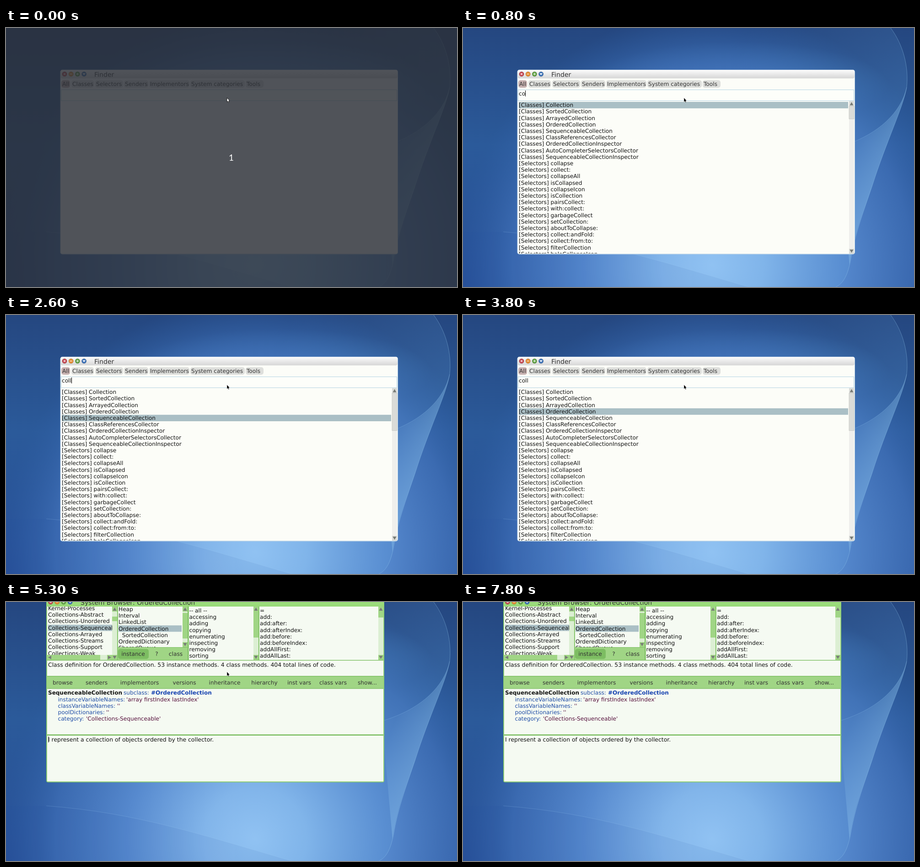
An HTML page for the animation above (8 s loop, 986 by 568 pixels).

```html
<!DOCTYPE html>
<html lang="en">
<head>
<meta charset="utf-8">
<title>Finder to browser</title>
<style>
  html, body { margin: 0; width: 100%; height: 100%; overflow: hidden; background: #26498a; }
  svg { display: block; }
  text { font: 12.15px "DejaVu Sans", sans-serif; fill: #111; white-space: pre; text-rendering: geometricPrecision; }
  .title { font-size: 14.1px; fill: #333; }
  .tab { font-size: 12.2px; fill: #333; }
  .mid { text-anchor: middle; }
  .wide { font-size: 12.4px; }
  .bold { font-weight: bold; font-size: 12px; }
  .key { fill: #1f4ca6; }
  .ref { fill: #1440b0; }
  .str { fill: #56103c; }
  .count { font: 19px Lato, sans-serif; fill: #fff; }
</style>
</head>
<body>
<svg id="stage" width="986" height="568" viewBox="0 0 986 568">
  <defs>
    <linearGradient id="sky" x2="0" y2="1">
      <stop offset="0" stop-color="#254780"/>
      <stop offset=".45" stop-color="#2b5a9a"/>
      <stop offset="1" stop-color="#274f97"/>
    </linearGradient>
    <radialGradient id="glow" gradientUnits="userSpaceOnUse" cx="545" cy="520" r="560">
      <stop offset="0" stop-color="#92c3f3"/>
      <stop offset=".2" stop-color="#82b5ea"/>
      <stop offset=".5" stop-color="#5689ce"/>
      <stop offset=".78" stop-color="#3e6eb5" stop-opacity=".85"/>
      <stop offset="1" stop-color="#2e5ea3" stop-opacity="0"/>
    </radialGradient>
    <radialGradient id="haze">
      <stop offset="0" stop-color="#5a9ad0" stop-opacity=".75"/>
      <stop offset="1" stop-color="#4a86c0" stop-opacity="0"/>
    </radialGradient>
    <linearGradient id="sheet" gradientUnits="userSpaceOnUse" x1="600" y1="60" x2="960" y2="200">
      <stop offset="0" stop-color="#6fb0e8" stop-opacity="0"/>
      <stop offset="1" stop-color="#6fb0e8" stop-opacity=".16"/>
    </linearGradient>
    <linearGradient id="fold" gradientUnits="userSpaceOnUse" x1="835" y1="300" x2="915" y2="330">
      <stop offset="0" stop-color="#8cc0ea" stop-opacity=".06"/>
      <stop offset="1" stop-color="#8cc0ea" stop-opacity=".42"/>
    </linearGradient>
    <linearGradient id="silver" x2="0" y2="1">
      <stop offset="0" stop-color="#fcfcfc"/>
      <stop offset="1" stop-color="#d6d6d6"/>
    </linearGradient>
    <linearGradient id="lime" x2="0" y2="1">
      <stop offset="0" stop-color="#a4e682"/>
      <stop offset="1" stop-color="#97d878"/>
    </linearGradient>
    <clipPath id="hits"><path d="M120 161H844V494.500H120Z"/></clipPath>
    <clipPath id="packages"><path d="M90 10H232V116H90Z"/></clipPath>
    <clipPath id="classes"><path d="M245 10H386V99H245Z"/></clipPath>
    <clipPath id="members"><path d="M400 10H814V126H400Z"/></clipPath>
  </defs>

  <g id="wallpaper" fill="none">
    <rect width="986" height="568" fill="url(#sky)"/>
    <ellipse cx="600" cy="125" rx="330" ry="95" fill="url(#haze)"/>
    <rect width="986" height="568" fill="url(#glow)"/>
    <path d="M935 0C962 36 975 85 970 130C962 175 925 250 895 345C872 412 857 455 849 500C842 542 832 560 815 568H500V0Z" fill="url(#sheet)"/>
    <path d="M970 130C957 190 900 238 822 261L845 520C855 450 873 412 895 345C925 250 962 175 970 130Z" fill="url(#fold)"/>
    <path d="M970 130C957 190 900 238 822 261" stroke="#8fc0ea" stroke-opacity=".3"/>
    <path d="M935 0C962 36 975 85 970 130C962 175 925 250 895 345C872 412 857 455 849 500C842 542 832 560 815 568" stroke="#9accf0" stroke-opacity=".38"/>
    <path d="M88 447C290 462 430 512 625 568H0V447Z" fill="#20509c" fill-opacity=".07"/>
    <path d="M88 447C290 462 430 512 625 568" stroke="#a5d0f5" stroke-opacity=".22"/>
  </g>

  <g id="finder"></g>
  <g id="browser"></g>
  <rect id="caret" width="1" height="13"/>
  <g id="intro">
    <rect width="986" height="568" fill="#2b2f36" fill-opacity=".82"/>
    <text class="count mid" x="492.500" y="290.500">1</text>
  </g>
  <path id="pointer" d="M0 0V9.200L2 7.500L3.500 10.400L5 9.600L3.600 6.900L6 6.500Z" stroke-width=".8"/>
</svg>
<script>
const NS = "http://www.w3.org/2000/svg";
const PITCH = 14.2, LOOP = 8000;
const $ = id => document.getElementById(id);

function add(parent, tag, attrs, content) {
  const el = document.createElementNS(NS, tag);
  for (const key in attrs) el.setAttribute(key, attrs[key]);
  if (content !== undefined) el.textContent = content;
  parent.appendChild(el);
  return el;
}
const box = (g, x, y, right, bottom, fill, rx = 0) =>
  add(g, "rect", { x, y, width: right - x, height: bottom - y, fill, rx });
const label = (g, x, y, content, cls = "") => add(g, "text", { x, y, class: cls }, content);
const rows = (g, x, y, names) => names.forEach((name, i) => label(g, x, y + i * PITCH, name));

function lights(g, x, y) {
  const signs = ["M-2 -2L2 2M2 -2L-2 2", "M-2.500 0H2.500", "M-2.500 0H2.500M0 -2.500V2.500", "M-2 -1H2L0 1.500Z"];
  ["#c5444e", "#e58f37", "#62a346", "#3f74b9"].forEach((fill, i) => {
    const button = add(g, "g", { transform: `translate(${x + i * 14.2} ${y})` });
    add(button, "circle", { r: 5.2, fill, stroke: "#000", "stroke-opacity": .25, "stroke-width": .8 });
    add(button, "path", { d: signs[i], fill: "#fff", stroke: "#fff", "stroke-width": 1.3, "stroke-opacity": .85 });
  });
}

function arrow(g, x, y, angle, fill) {
  box(g, x, y, x + 11, y + 11, fill);
  add(g, "path", { d: "M-4 3.500L0 -3.500L4 3.500Z", fill: "#777b76",
    transform: `translate(${x + 5.5} ${y + 5.5}) rotate(${angle})` });
}

function scrollbar(g, x, top, bottom, from, to, track, face) {
  box(g, x, top, x + 11, bottom, track);
  arrow(g, x, top, 0, face);
  arrow(g, x, bottom - 11, 180, face);
  return box(g, x, from, x + 11, to, face);
}

function buildFinder(g) {
  box(g, 118.5, 91.5, 857, 496.5, "#bfd6e8", 5);
  box(g, 119.5, 92, 856, 495, "#fcfdf8", 4);
  box(g, 119.5, 92, 856, 110.5, "url(#silver)", 4);
  lights(g, 128, 101);
  label(g, 193, 107, "Finder", "title");

  const tabs = [[121, 140, "All"], [143, 192, "Classes"], [195, 256, "Selectors"], [258, 311, "Senders"],
    [313, 401, "Implementors"], [403, 522, "System categories"], [524, 563, "Tools"]];
  tabs.forEach(([x, right, name], i) => {
    box(g, x, 114.5, right, 131, i ? "#dedfdc" : "#c8b2b1", 5);
    label(g, x + 2, 127.3, name, "tab");
  });
  add(g, "rect", { x: 120.5, y: 135.5, width: 734, height: 24, fill: "#fdfefa", stroke: "#b4d3e3" });

  const query = label(g, 122, 148.3, "");
  const results = add(g, "g", {});
  const list = add(results, "g", { "clip-path": "url(#hits)" });
  const bar = box(list, 122, 162, 842, 162 + PITCH, "#aabfc5");
  const classes = ["Collection", "SortedCollection", "ArrayedCollection", "OrderedCollection",
    "SequenceableCollection", "ClassReferencesCollector", "OrderedCollectionInspector",
    "AutoCompleterSelectorsCollector", "SequenceableCollectionInspector"];
  const selectors = ["collapse", "collect:", "collapseAll", "isCollapsed", "collapseIcon", "isCollection",
    "pairsCollect:", "with:collect:", "garbageCollect", "setCollection:", "aboutToCollapse:",
    "collect:andFold:", "collect:from:to:", "filterCollection", "haloCollapseIcon"];
  rows(list, 122, 173.2, [...classes.map(n => "[Classes] " + n), ...selectors.map(n => "[Selectors] " + n)]);
  const thumb = scrollbar(results, 844, 160.5, 495, 171.5, 253.5, "#efefec", "#dadbd8");
  thumb.setAttribute("stroke", "#c0c2be");
  thumb.setAttribute("stroke-width", .7);
  return { query, results, bar, thumb };
}

function buildBrowser(g) {
  const paper = "#f5faf2", green = "#a0d585", dark = "#80c067", track = "#dcefd3";
  const scroll = (x, bottom, from, to) => scrollbar(g, x, 10, bottom, from, to, track, green);
  box(g, 88, -12, 827, 395.5, "#8acb6e", 4);
  box(g, 89.5, -12, 825.5, 394, green, 2);
  box(g, 89, -12, 826, 10, "url(#lime)");
  lights(g, 97.5, 0);
  label(g, 163, 6.3, "System Browser: OrderedCollection", "title");

  [[90, 243, 127], [245, 397, 99], [400, 552, 127], [554, 825, 127]]
    .forEach(([x, right, bottom]) => box(g, x, 10, right, bottom, paper));
  box(g, 243, 10, 244.5, 127, dark);
  box(g, 397, 10, 399, 127, dark);
  box(g, 552, 10, 553.5, 127, dark);

  const packages = add(g, "g", { "clip-path": "url(#packages)" });
  box(packages, 92, 49.8, 232, 63.5, "#aabfc5");
  rows(packages, 92, 18, ["Kernel-Processes", "Collections-Abstract", "Collections-Unordered",
    "Collections-Sequenceable", "Collections-Arrayed", "Collections-Streams", "Collections-Support", "Collections-Weak"]);
  scroll(232, 127, 32, 42);
  box(g, 90, 116, 232, 127, track);
  arrow(g, 90, 116, -90, green);
  arrow(g, 221, 116, 90, green);
  box(g, 101, 116, 206, 127, green);

  const classes = add(g, "g", { "clip-path": "url(#classes)" });
  box(classes, 246, 51.3, 384, 65.3, "#aabfc5");
  rows(classes, 246, 19.9, ["Heap", "Interval", "LinkedList", "OrderedCollection",
    "  SortedCollection", "OrderedDictionary", "SharedQueue"]);
  scroll(386, 99, 24, 80);
  box(g, 245, 99, 397, 100, dark);
  box(g, 245, 103, 312, 125, "#7dbd62", 5);
  [[278, "instance"], [329.5, "?"], [371, "class"]].forEach(([x, name]) => label(g, x, 118.3, name, "tab mid"));

  const members = add(g, "g", { "clip-path": "url(#members)" });
  rows(members, 400.5, 23, ["-- all --", "accessing", "adding", "copying", "enumerating", "inspecting", "removing", "sorting"]);
  rows(members, 555, 23, ["=", "add:", "add:after:", "add:afterIndex:", "add:before:", "add:beforeIndex:", "addAllFirst:", "addAllLast:"]);
  scroll(541, 127, 21, 78);
  scroll(814, 127, 21, 34);

  box(g, 90, 127, 825, 128.5, dark);
  box(g, 90, 128.5, 825, 162, paper);
  label(g, 92, 142, "Class definition for OrderedCollection. 53 instance methods. 4 class methods. 404 total lines of code.", "wide");
  box(g, 90, 162, 825, 163.5, dark);
  [[124, "browse"], [198, "senders"], [292, "implementors"], [390, "versions"], [478, "inheritance"],
    [565, "hierarchy"], [641, "inst vars"], [715, "class vars"], [790, "show..."]]
    .forEach(([x, name]) => label(g, x, 181, name, "tab mid"));
  box(g, 90, 189, 825, 190.5, dark);

  box(g, 90, 190.5, 825, 290.5, paper);
  label(g, 92, 203.4, "SequenceableCollection", "bold");
  label(g, 257, 203.4, "subclass:", "key");
  label(g, 317, 203.4, "#OrderedCollection", "bold ref");
  [["instanceVariableNames:", 263, "'array firstIndex lastIndex'"], ["classVariableNames:", 243, "''"],
    ["poolDictionaries:", 219, "''"], ["category:", 175, "'Collections-Sequenceable'"]]
    .forEach(([key, x, value], i) => {
      const y = 203.4 + (i + 1) * PITCH;
      label(g, 113.5, y, key, "key");
      label(g, x, y, value, "str");
    });

  box(g, 90, 290.5, 825, 293, dark);
  box(g, 90, 293, 825, 393.5, paper);
  label(g, 92, 306, "I represent a collection of objects ordered by the collector.", "wide");
}

// Each timeline lists [start in ms, value]; the latest started value holds.
const TYPED = [[0, ""], [700, "c"], [800, "co"], [1200, "coll"]];
const THUMB = [[0, 12], [800, 28], [1200, 82]];
const SELECTED = [[0, 0], [2100, 1], [2200, 2], [2500, 3], [2600, 4], [3300, 3]];
const BLINKS = [500, 1700, 2100, 3200, 3300, 3800, 4300, 4700, 5300, 5900, 6400, 6800];
const POINTER = [[0, [483, 153]], [7100, [430, 125]], [7200, [370, 90]], [7300, [322, 64]]];
const OPEN = 4300;

const at = (timeline, t) => timeline.filter(([start]) => start <= t).pop()[1];
const show = (el, on) => el.setAttribute("visibility", on ? "visible" : "hidden");
const display = (el, on) => { el.style.display = on ? "" : "none"; };

const { query, results, bar, thumb } = buildFinder($("finder"));
buildBrowser($("browser"));
const caret = $("caret"), pointer = $("pointer");
const begin = performance.now();

function draw() {
  const t = (performance.now() - begin) % LOOP;
  const searching = t < OPEN, intro = t < 100;
  display($("finder"), searching);
  display($("browser"), !searching);
  display($("intro"), intro);

  let caretX = 92.5;
  if (searching) {
    query.textContent = at(TYPED, t);
    caretX = Math.round(122 + query.getComputedTextLength());
    display(results, t >= 700);
    bar.setAttribute("y", 162 + at(SELECTED, t) * PITCH);
    thumb.setAttribute("height", at(THUMB, t));
  }
  caret.setAttribute("x", caretX);
  caret.setAttribute("y", searching ? 137 : 295);
  show(caret, BLINKS.filter(start => start <= t).length % 2);

  const [x, y] = at(POINTER, t);
  pointer.setAttribute("transform", `translate(${x} ${y})`);
  pointer.setAttribute("fill", intro ? "#fff" : "#000");
  pointer.setAttribute("stroke", intro ? "#000" : "#fff");
  pointer.setAttribute("stroke-opacity", intro ? 1 : .6);
  show(pointer, t < 7800);
  requestAnimationFrame(draw);
}
draw();
</script>
</body>
</html>
```
